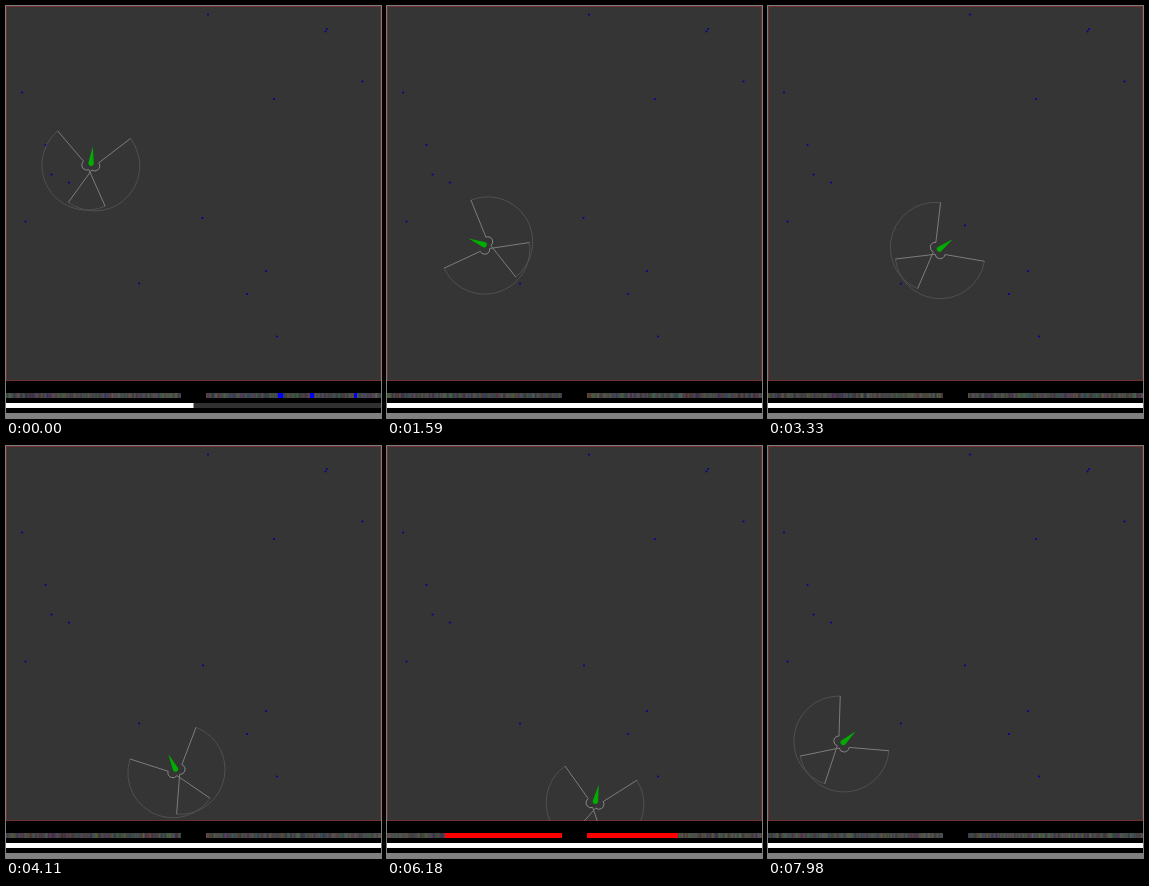
An HTML page with a canvas that plays this animation: 375x412 px, repeating every 8000 ms.

```html
<!DOCTYPE html>
<html>
<head>
<meta charset="utf-8">
<style>
html, body { margin: 0; width: 100%; height: 100%; overflow: hidden; background: #000; }
canvas { display: block; }
</style>
</head>
<body>
<canvas id="stage" width="375" height="412"></canvas>
<script>
const ctx = document.getElementById('stage').getContext('2d');
const LOOP = 8000, STEP = 30, SIZE = 375;
const SPEED = 0.105;                       // px per ms
const RANGE = 45, PUPIL = 5, EYE_GAP = 4;
const NEAR = 46.5, FAR = 210;              // eye limits, degrees from heading
const RETINA = 175, FOOD_RADIUS = 1;
const PUSH_TIME = 2950;                    // the creature bumps one food dot
const rad = d => d * Math.PI / 180;
const clamp = v => Math.max(9, Math.min(SIZE - 9, v));

// Key poses: time, x, y, heading. The creature always turns left.
const poses = [
  [0, 84.8, 159.5, -84],
  [1590, 99.3, 239.5, -158.5],
  [3330, 169.7, 244.5, -396.8],
  [4920, 261.5, 363.5, -557.5],
  [6180, 208, 357.5, -798.8],
  [7020, 169.7, 311.5, -1052],
  [7980, 73.5, 298, -1121.7]
];

const food = [
  [202, 8.5], [321, 23], [319.5, 25.5], [356.5, 75.5], [16, 86.5], [268, 93], [39.5, 139],
  [45.5, 168.5], [63, 176.5], [19.5, 215.5], [260, 265], [133, 277.5], [241, 288], [271, 330.5]
];

// Swims tail first along a circular arc, with a steady drift to the next pose
function poseAt(t) {
  const next = Math.max(1, poses.findIndex(p => p[0] > t));
  const i = t >= poses.at(-1)[0] ? poses.length - 1 : next;
  const [t0, x0, y0, a0] = poses[i - 1], [t1, x1, y1, a1] = poses[i];
  const u = Math.min(1, (t - t0) / (t1 - t0));
  const from = rad(a0), turn = rad(a1 - a0), radius = SPEED * (t1 - t0) / turn;
  const arcX = k => radius * (Math.sin(from) - Math.sin(from + turn * k));
  const arcY = k => radius * (Math.cos(from + turn * k) - Math.cos(from));
  return {
    x: clamp(x0 + arcX(u) + u * (x1 - x0 - arcX(1))),
    y: clamp(y0 + arcY(u) + u * (y1 - y0 - arcY(1))),
    heading: from + turn * u
  };
}

function makeEye({ x, y, heading }, side) {
  return {
    side,
    x: x - Math.sin(heading) * EYE_GAP * side,
    y: y + Math.cos(heading) * EYE_GAP * side,
    front: heading + side * rad(NEAR),
    back: heading + side * rad(FAR)
  };
}

function drawEye({ x, y, front, back, side }) {
  const arc = (r, color) => {
    ctx.strokeStyle = color;
    ctx.beginPath();
    ctx.arc(x, y, r, front, back, side < 0);
    ctx.stroke();
  };
  arc(RANGE, '#505050');
  arc(PUPIL, '#888');
  ctx.strokeStyle = '#7c7c7c';
  ctx.beginPath();
  for (const a of [front, back]) {
    ctx.moveTo(x + PUPIL * Math.cos(a), y + PUPIL * Math.sin(a));
    ctx.lineTo(x + RANGE * Math.cos(a), y + RANGE * Math.sin(a));
  }
  ctx.stroke();
}

function drawBody({ x, y, heading }) {
  ctx.save();
  ctx.translate(x, y);
  ctx.rotate(heading);
  ctx.fillStyle = '#00ac00';
  ctx.beginPath();
  ctx.moveTo(19, 0);
  ctx.arc(2.3, 0, 2.7, 1.4, -1.4);
  ctx.fill();
  ctx.restore();
}

function noise(n) {
  const s = Math.sin(n * 12.9898) * 43758.5453;
  return s - Math.floor(s);
}

// What a ray from the eye meets first: food, wall or nothing
function look(eye, angle, items) {
  const c = Math.cos(angle), s = Math.sin(angle);
  const wall = Math.min(
    (c > 0 ? SIZE - eye.x : -eye.x) / c,
    (s > 0 ? SIZE - eye.y : -eye.y) / s);
  const seen = items.some(([fx, fy]) => {
    const dx = fx - eye.x, dy = fy - eye.y, along = dx * c + dy * s;
    return along > 0 && along < Math.min(RANGE + 2 * FOOD_RADIUS, wall)
      && Math.abs(dx * s - dy * c) < FOOD_RADIUS;
  });
  return seen ? '#00f' : wall < RANGE ? '#f00' : null;
}

function drawRetina(eye, left, items, seed) {
  for (let i = 0; i < RETINA; i++) {
    const f = (i + 0.5) / RETINA, k = eye.side > 0 ? f : 1 - f;
    const n = seed + (left + i) * 3;
    // neighbouring columns share half of their grain
    const tone = j => Math.round(42 + 28 * (noise(n + j) + noise(n + j + 3)));
    ctx.fillStyle = look(eye, eye.front + (eye.back - eye.front) * k, items)
      || `rgb(${tone(0)},${tone(1)},${tone(2)})`;
    ctx.fillRect(left + i, 387, 1, 5);
  }
}

function bar(y, width, color) {
  ctx.fillStyle = color;
  ctx.fillRect(0, y, width, 5);
}

function draw(t) {
  const pose = poseAt(t);
  const eyes = [makeEye(pose, 1), makeEye(pose, -1)];
  const items = [...food, t < PUSH_TIME ? [196.5, 212] : [197, 219.5]];

  ctx.fillStyle = '#000';
  ctx.fillRect(0, 0, SIZE, 412);
  ctx.save();
  ctx.beginPath();
  ctx.rect(0, 0, SIZE, SIZE);
  ctx.clip();
  ctx.fillStyle = '#353535';
  ctx.fillRect(0, 0, SIZE, SIZE);
  ctx.lineWidth = 1;
  ctx.strokeStyle = '#703030';
  ctx.strokeRect(0.5, 0.5, SIZE - 1, SIZE - 1);
  ctx.fillStyle = '#0000a0';
  for (const [x, y] of items) {
    ctx.beginPath();
    ctx.arc(x, y, FOOD_RADIUS, 0, 2 * Math.PI);
    ctx.fill();
  }
  eyes.forEach(drawEye);
  drawBody(pose);
  ctx.restore();

  const seed = t / STEP * 1.37;
  drawRetina(eyes[0], 0, items, seed);
  drawRetina(eyes[1], 200, items, seed);
  bar(397, SIZE, '#303030');
  bar(397, t < STEP ? SIZE / 2 : SIZE, '#fff');
  bar(407, SIZE, '#808080');
}

const start = performance.now();
function tick() {
  const t = (performance.now() - start) % LOOP;
  draw(Math.floor(t / STEP) * STEP);
  requestAnimationFrame(tick);
}
tick();
</script>
</body>
</html>
```
